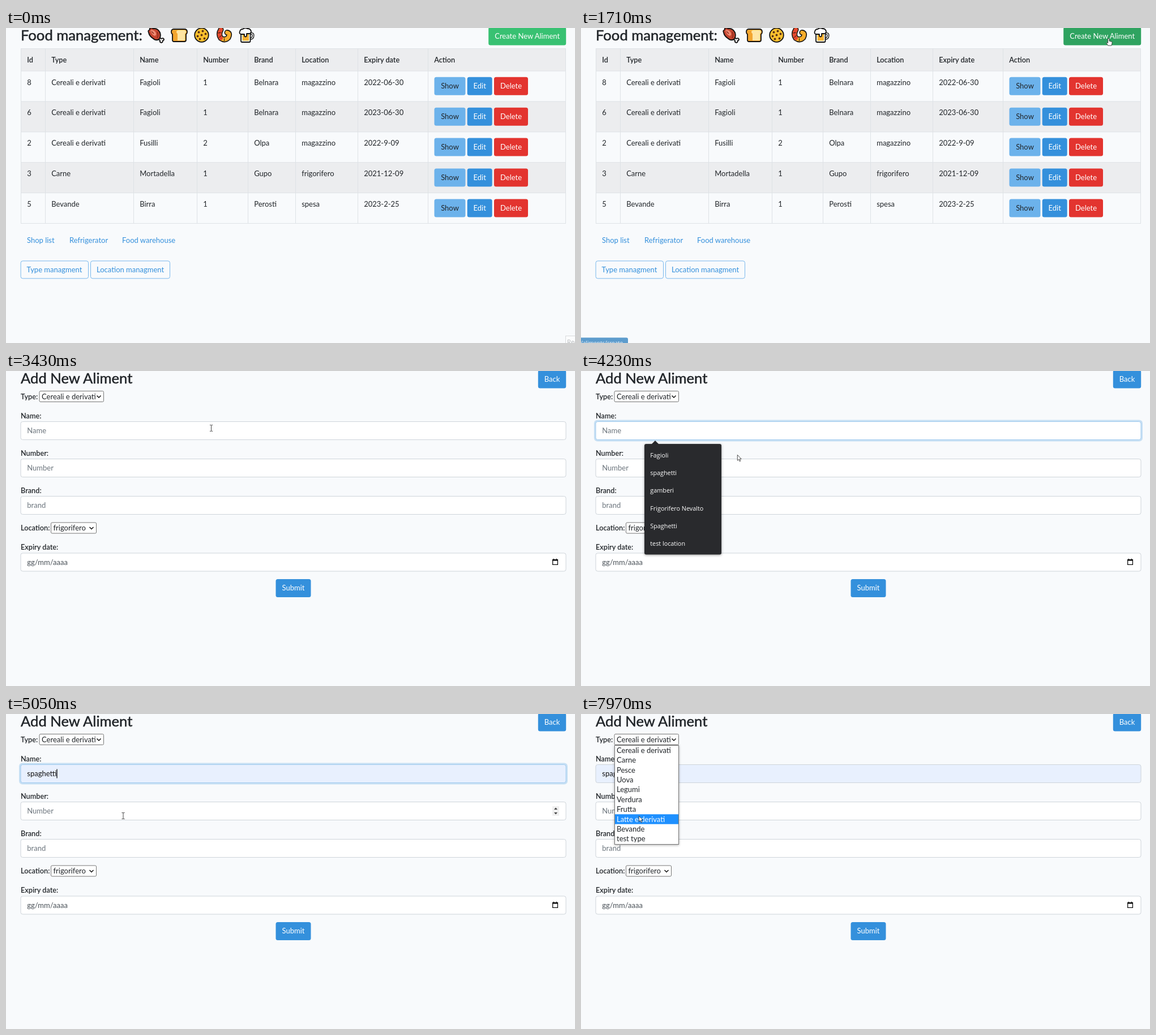
Animation of 1005x557 px, one loop 8000 ms. Source, as an HTML page:

```html
<!DOCTYPE html>
<html lang="en">
<head>
<meta charset="utf-8">
<title>Food management</title>
<style>
html, body { margin: 0; width: 100%; height: 100%; overflow: hidden; background: #f8fafc; }
svg { display: block; width: 100vw; height: 100vh; }
text { font: 13px Lato, "Open Sans", sans-serif; white-space: pre; }
.bold { font-weight: 600; font-size: 12.7px; }
.title { font-size: 25.6px; stroke: #212529; stroke-width: .5px; }
.ui { font-family: "Open Sans", sans-serif; font-size: 10.8px; }
</style>
</head>
<body>
<svg id="stage" viewBox="0 0 1005 557"></svg>
<script>
const LOOP = 8000, TICK = 100.9;
const INK = '#212529', BLUE = '#3490dc', SKY = '#6cb2eb', RED = '#e3342f', LINE = '#dee2e6';
const stage = document.getElementById('stage');
const clamp = v => Math.max(0, Math.min(1, v));

// y is the middle of the capitals
const text = (x, y, s, fill = INK, cls = '', extra = '') =>
  `<text x="${x}" y="${y + 4.5}" fill="${fill}" class="${cls}" ${extra}>${s}</text>`;
const rect = (x, y, w, h, fill, extra = '') =>
  `<rect x="${x}" y="${y}" width="${w}" height="${h}" fill="${fill}" ${extra}/>`;
const path = (d, fill = 'none', extra = '') => `<path d="${d}" fill="${fill}" ${extra}/>`;
const stroke = (color, width = 1) => `stroke="${color}" stroke-width="${width}"`;
const at = (x, y, s) => `<g transform="translate(${x} ${y})">${s}</g>`;

const button = (x, y, w, label, fill, ink = '#fff') =>
  rect(x, y, w, 32, fill, 'rx="3.5"') + text(x + w / 2, y + 15.7, label, ink, '', 'text-anchor="middle"');
const outlined = (x, y, w, label) =>
  rect(x + .5, y + .5, w - 1, 31, 'none', `rx="3.5" ${stroke(SKY, .9)}`) + text(x + 11, y + 15.7, label, BLUE);

// ---- food icons, each about 28 x 26 ----
const icons = () => {
  const o = `${stroke('#111', 1.8)} stroke-linejoin="round" stroke-linecap="round"`;
  const dots = [[-5, -5], [2, -7], [7, -2], [-7, 2], [0, 0], [5, 6], [-3, 7]];
  const meat = path('M18 15L23 19Q27 17 28 20Q28 22 26 22Q26 26 23 26Q20 25 21 22L16 18Z', '#fff', o)
    + path('M3 3Q2-1 6 0L9 1Q17 0 21 8Q23 15 20 19Q15 24 8 18Q2 14 1 8Q-1 4 3 3Z', '#c5452f', o)
    + path('M4 4Q9 2 13 7Q16 12 12 14Q6 12 4 4Z', '#f08b73')
    + path('M6 6L10 10M16 7Q19 12 16 18', 'none', stroke('#8c2b1e', 1.5));
  const bread = path('M4 2H23Q28 2 28 7Q28 10 26 11V21Q26 24 23 24H4Q2 24 2 21V11Q0 10 0 7Q0 2 4 2Z', '#f3a52f', o)
    + path('M13 4H23Q26 4 26 7Q26 9 24 10V22H11V10Q9 9 9 7Q9 4 13 4Z', '#ffe5a3');
  const cookie = `<circle cx="13.5" cy="12.5" r="12.3" fill="#fbc02d" ${o}/>`
    + dots.map(([x, y]) => `<circle cx="${13.5 + x}" cy="${12.5 + y}" r="1.9" fill="#5a3218"/>`).join('');
  const curl = 'M8 3Q3 11 8 18Q15 23 21 17Q25 9 19 8';
  const shrimp = path(curl, 'none', `${stroke('#111', 10)} stroke-linecap="round"`)
    + path(curl, 'none', `${stroke('#f7ad2c', 6.8)} stroke-linecap="round"`)
    + path('M8 3Q3 11 8 18', 'none', `${stroke('#e5472f', 6.8)} stroke-linecap="round"`)
    + path('M3 9L8 8M5 17L9 13M14 18V23', 'none', stroke('#111', 1));
  const beer = path('M19 10H22Q24.5 10 24.5 13Q24.5 19 19 19', 'none', stroke('#111', 4))
    + path('M19 10H22Q24.5 10 24.5 13Q24.5 19 19 19', 'none', stroke('#fff', 1.4))
    + path('M3 7H19.5V23Q19.5 25 17.5 25H5Q3 25 3 23Z', '#fff', o)
    + path('M5.5 11H17V22.5H5.5Z', '#f9b233')
    + path('M3 11Q-.5 10 1 6Q2 2 6 2Q10-1 14 1Q20 1 21 6Q21 10 17 10H13V14Q11 17 9 14V11Z', '#fff', o);
  return [meat, bread, cookie, shrimp, beer].map((s, i) => at([251, 292, 332, 371.5, 412][i], 0, s)).join('');
};

// ---- list page ----
const columns = [26.5, 69.5, 225.5, 337.5, 427.5, 511.5, 621.5, 745.5, 988.5];
const heads = ['Id', 'Type', 'Name', 'Number', 'Brand', 'Location', 'Expiry date', 'Action'];
const foods = [
  [8, 'Cereali e derivati', 'Fagioli', 1, 'Belnara', 'magazzino', '2022-06-30'],
  [6, 'Cereali e derivati', 'Fagioli', 1, 'Belnara', 'magazzino', '2023-06-30'],
  [2, 'Cereali e derivati', 'Fusilli', 2, 'Olpa', 'magazzino', '2022-9-09'],
  [3, 'Carne', 'Mortadella', 1, 'Gupo', 'frigorifero', '2021-12-09'],
  [5, 'Bevande', 'Birra', 1, 'Perosti', 'spesa', '2023-2-25']
];

function listPage(k) {
  const cells = (row, y, cls) => row.map((s, i) => text(columns[i] + 10.7, y, s, INK, cls)).join('');
  let out = text(26, 17, 'Food management:', INK, 'title') + icons();
  if (k >= 20) out += rect(849, -4.6, 143, 38, '#9be0b8', 'rx="6"');
  out += button(852.2, -1.6, 137, 'Create New Aliment', k < 14 ? '#38c172' : k < 20 ? '#2fa360' : '#2d995b');
  out += rect(26, 36, 963, 40, '#ecedef') + cells(heads, 56, 'bold');
  let lines = 'M26 36.5H989M26 76H989';
  foods.forEach((food, i) => {
    const y = 76 + 53.9 * i;
    if (i % 2) out += rect(26, y, 963, 53.9, '#ecedef');
    out += cells(food, y + 20, '') + button(756.5, y + 10.8, 55, 'Show', SKY, INK)
      + button(814.7, y + 10.8, 44, 'Edit', BLUE) + button(862, y + 10.8, 60, 'Delete', RED);
    lines += `M26 ${y + 53.9}H989`;
  });
  lines += columns.map(x => `M${x} 36V345.5`).join('');
  out += path(lines, 'none', stroke(LINE));
  out += text(37, 375, 'Shop list', BLUE) + text(112, 375, 'Refrigerator', BLUE) + text(205, 375, 'Food warehouse', BLUE);
  out += outlined(25.6, 411.4, 120.4, 'Type managment') + outlined(149, 411.4, 141, 'Location managment');
  if (k < 1) out += rect(988.5, 544.5, 20, 16, '#fbfcfd', stroke('#d8dadc')) + text(991, 554, 'Rec', '#b4b7ba', 'ui');
  return out;
}

// ---- form page ----
const types = ['Cereali e derivati', 'Carne', 'Pesce', 'Uova', 'Legumi', 'Verdura', 'Frutta',
  'Latte e derivati', 'Bevande', 'test type'];
const hints = ['Fagioli', 'spaghetti', 'gamberi', 'Frigorifero Nevalto', 'Spaghetti', 'test location'];
const fieldTops = [89.5, 155.5, 221.5, 322];

const field = (y, label, ink = '#6c757d', fill = '#fff', border = '#ced4da') =>
  rect(26, y, 963, 32, fill, `rx="3.5" ${stroke(border)}`) + text(37.3, y + 16, label, ink);
const select = (x, y, w, label) =>
  rect(x, y, w, 19, '#fff', `rx="2" ${stroke('#767676')}`) + text(x + 4, y + 9.5, label)
  + path(`M${x + w - 12} ${y + 8}l3.5 3.5l3.5 -3.5`, 'none', stroke('#111', 1.5));

function hintList(active) {
  let out = path('M124 130L131 123L138 130Z', '#292a2d') + rect(112, 129, 136, 195.5, '#292a2d',
    'rx="3" style="filter:drop-shadow(0 1px 2px #0006)"');
  if (active) out += rect(112, 164.5, 136, 31.2, '#46474b');
  return out + hints.map((s, i) => text(122.3, 148.3 + 31.25 * i, s, '#fff', 'ui')).join('');
}

function typeList(y) {
  const pitch = 17.4, active = Math.max(0, Math.floor((y - 55.5) / pitch));
  return rect(59.5, 55.5, 113, 175, '#fff', `${stroke('#767676')} style="filter:drop-shadow(0 1px 2px #0005)"`)
    + rect(60, 55.5 + pitch * active, 112, pitch, '#1e90ff')
    + types.map((s, i) => text(63, 64.2 + pitch * i, s, i === active ? '#fff' : INK)).join('');
}

function formPage(k, c) {
  const hinting = k >= 35 && k < 48, choosing = k >= 57, focused = k >= 35 && k < 56;
  const preview = hinting && c.x < 248 && c.y > 164;
  const filled = preview || k >= 48;
  let out = text(26, 17, 'Add New Aliment', INK, 'title') + button(939.8, -1.6, 49.4, 'Back', BLUE);
  [['Type:', 45], ['Name:', 79], ['Number:', 145], ['Brand:', 211], ['Location:', 277], ['Expiry date:', 311]]
    .forEach(([s, y]) => out += text(26, y, s, INK, 'bold'));
  out += select(59, 35.5, 113.5, types[0]) + select(79.5, 268, 80, 'frigorifero');
  if (focused) out += rect(23, 86.5, 969, 38, BLUE, `rx="6" opacity="${k < 36 ? .12 : .25}"`);
  out += field(fieldTops[0], filled ? 'spaghetti' : 'Name', filled ? '#111' : '#6c757d',
    filled ? '#e8f0fe' : '#fff', focused ? '#a1cbef' : '#ced4da');
  if (focused && k >= 48) out += rect(89.4, 97.5, 1.2, 16, '#000');
  out += field(fieldTops[1], 'Number') + field(fieldTops[2], 'brand') + field(fieldTops[3], 'gg/mm/aaaa', '#495057');
  out += path('M965.6 334H974.4V342.4H965.6ZM967.5 331.8V334M972.5 331.8V334', 'none', stroke('#111', 1.3))
    + rect(965, 333, 10, 2.6, '#111');
  out += button(476.5, 368, 62, 'Submit', BLUE);
  const inField = c.x > 26 && c.x < 989 && fieldTops.some(y => c.y > y && c.y < y + 32);
  const beam = inField && !choosing && !(hinting && c.x < 248 && c.y > 125);
  if (beam && c.y > 155 && c.y < 188)
    out += rect(965, 163, 12, 17, '#efefef') + path('M968 169l3 -3.5l3 3.5ZM968 174l3 3.5l3 -3.5Z', '#444');
  if (hinting) out += hintList(preview);
  if (choosing) out += typeList(c.y);
  return out + pointer(c, beam ? 'beam' : 'arrow');
}

// ---- pointer ----
const route = [
  [8, 952, 316], [10, 948, 205], [12, 941, 85], [14, 934, 22], [15, 932, 18], [24, 932, 18],
  [25, 930, 17], [27, 930, 17], [30, 700, 52], [33, 400, 96], [35, 325, 106], [38, 325, 106],
  [42, 276, 148], [45, 207, 180], [50, 207, 180], [53, 144, 36], [54, 144, 36], [56, 141, 48],
  [69, 141, 48], [72, 122, 110], [76, 102, 199], [77, 102, 198], [79, 102, 180]
];

function position(k) {
  const i = route.findIndex(p => p[0] >= k);
  const b = route[i], a = route[i - 1] || b;
  const u = a === b ? 0 : (k - a[0]) / (b[0] - a[0]);
  return { x: a[1] + (b[1] - a[1]) * u, y: a[2] + (b[2] - a[2]) * u };
}

const shapes = {
  arrow: path('M.3 .3V10.3L2.6 8.2L4.2 11.8L5.8 11.1L4.2 7.6H7.2Z', '#fff', stroke('#222', .8)),
  hand: path('M-1.3 1Q0-.6 1.1 1V5L5.5 6.2Q6.5 6.6 6 9L5 13H-1L-4 8.8Q-3.8 6.8-1.3 8.6Z', '#fff', stroke('#222', .8)),
  beam: path('M-2.5 -5.5H-.8L0 -5L.8 -5.5H2.5M0 -5V5M-2.5 5.5H-.8L0 5L.8 5.5H2.5', 'none', stroke('#333', .9))
};
const pointer = (c, kind) => at(c.x, c.y, shapes[kind]);

function statusBar(k) {
  const alpha = clamp((k - 15) * .31) * clamp((31 - k) / 3);
  return alpha ? `<g opacity="${alpha}">${path('M0 547.5H80Q83 547.5 83 550.5V557H0Z', '#0063b1')}
    ${text(-.5, 555.3, '/aliments/create', '#fff', 'ui', 'style="font-size:9.8px"')}</g>` : '';
}

function scene(k) {
  const c = position(k);
  const page = k < 25 ? listPage(k) + (k >= 8 ? pointer(c, k < 14 ? 'arrow' : 'hand') : '') : formPage(k, c);
  return page + statusBar(k);
}

let shown = -1;
function frame(now) {
  const k = Math.min(79, Math.floor((now % LOOP + 15) / TICK));
  if (k !== shown) stage.innerHTML = scene(shown = k);
  requestAnimationFrame(frame);
}
requestAnimationFrame(frame);
</script>
</body>
</html>
```
